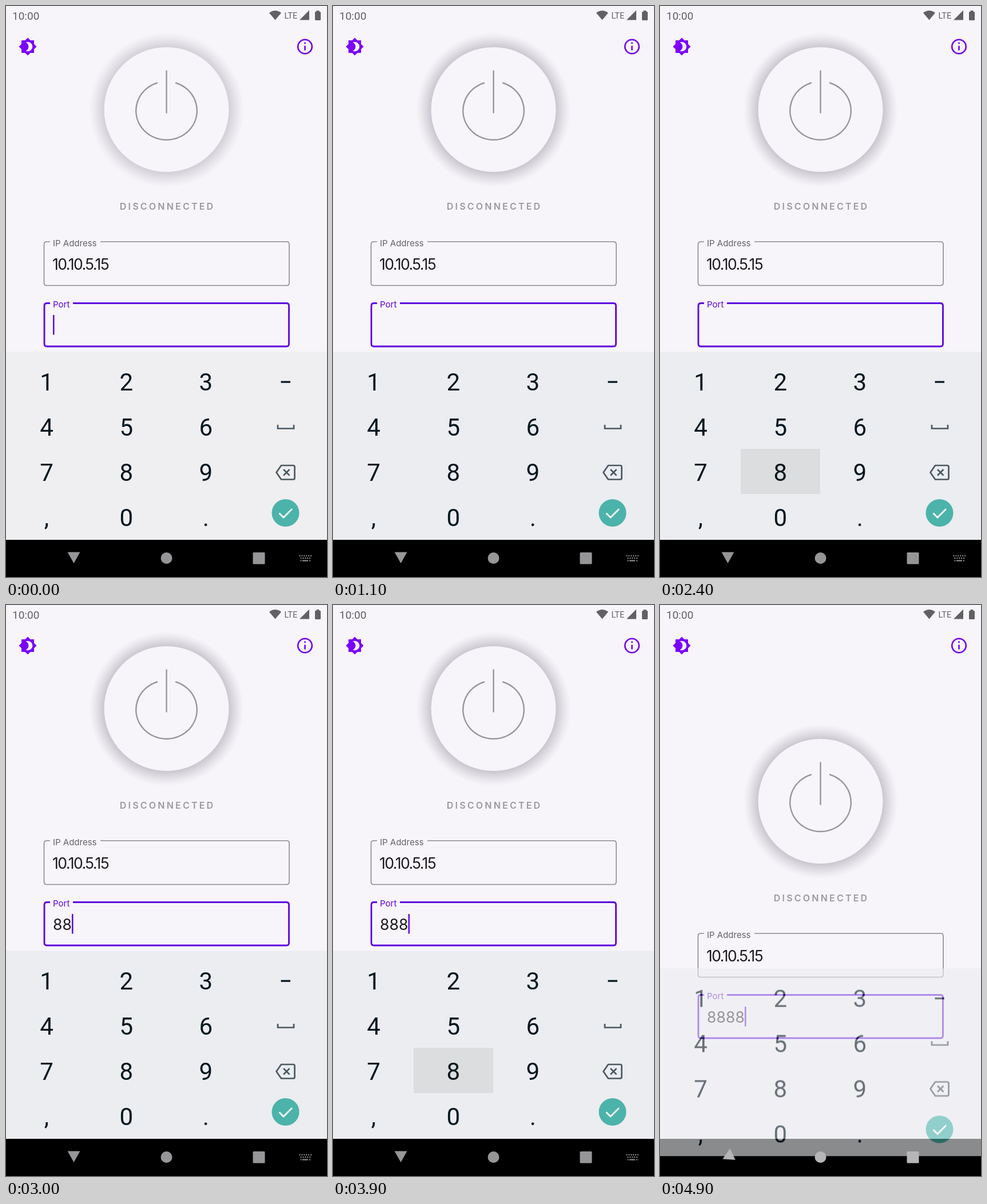
Recreate the animation shown at these times as an HTML page. Size 561x998 px, loop 5 s.

```html
<!DOCTYPE html>
<html lang="en">
<head>
<meta charset="utf-8">
<title>Connection screen</title>
<style>
  html, body { margin: 0; width: 100%; height: 100%; overflow: hidden; background: #f7f5f9; }
  svg { display: block; width: 561px; height: 998px; }
  .line { fill: none; }
  .ui { font-family: Inter, sans-serif; }
  .label { font-size: 15px; }
  .value { font-size: 26.5px; fill: #1c1a1f; }
  .state { font-size: 16px; font-weight: 600; letter-spacing: 3.2px; fill: #9b999f; }
  .sys { font-family: Roboto, sans-serif; fill: #616063; }
  .digits { font: 42px Roboto, sans-serif; fill: #04161f; text-anchor: middle; }

  .anim { animation: 5s linear infinite; }
  .step { animation: 5s step-end infinite; }
  #content { animation-name: drop; }
  #shadow { animation-name: settle; }
  #typed { animation-name: type; }
  #caret { animation-name: blink; }
  #press { animation-name: press; }
  #keyboard { animation-name: leave; }
  #panel { animation-name: tint; }
  #back { animation-name: turn; transform-origin: 118.5px 964px; }
  #icons { animation-name: lighten; }
  #switcher { animation-name: vanish; }

  @keyframes drop { 0% { transform: none; } 97%, 100% { transform: translateY(162px); } }
  @keyframes settle { 0% { opacity: .8; } 12%, 100% { opacity: 1; } }
  @keyframes tint { 0% { fill: #efeef1; } 12%, 100% { fill: #ebedf0; } }
  @keyframes type {
    0% { transform: none; }
    49.4% { transform: translateX(16.5px); }
    59.2% { transform: translateX(33px); }
    69.4% { transform: translateX(49.5px); }
    78.8%, 100% { transform: translateX(66px); }
  }
  @keyframes blink {
    0%, 11.6%, 31.6%, 49.4%, 59.2%, 69.4%, 78.8%, 96.8%, 100% { opacity: 1; }
    1.6%, 21.6%, 41.6%, 58.4%, 68.2%, 78.4%, 87.8% { opacity: 0; }
  }
  @keyframes press {
    0%, 49.4%, 59.2%, 69.4%, 78.8%, 100% { opacity: 0; }
    47.6%, 57.6%, 67.6%, 77.6% { opacity: 1; }
  }
  @keyframes leave {
    0%, 97% { transform: none; opacity: 1; }
    98% { transform: translateY(30px); opacity: .6; }
    99.5%, 100% { transform: translateY(66px); opacity: 0; }
  }
  @keyframes turn {
    0%, 97% { transform: none; }
    98% { transform: rotate(64deg); }
    99%, 100% { transform: rotate(90deg); }
  }
  @keyframes lighten { 0% { fill: #969597; } 97%, 100% { fill: #b6b5b7; } }
  @keyframes vanish { 0% { opacity: 1; } 97%, 100% { opacity: 0; } }
</style>
</head>
<body>
<svg viewBox="0 0 561 998">
  <defs>
    <radialGradient id="halo" gradientUnits="userSpaceOnUse" cx="280.5" cy="181.5" r="135">
      <stop offset=".8" stop-color="#c8c6cd"/>
      <stop offset=".87" stop-color="#dbd9df"/>
      <stop offset=".94" stop-color="#eceaef"/>
      <stop offset="1" stop-color="#f7f5f9"/>
    </radialGradient>
  </defs>
  <rect width="561" height="998" fill="#f7f5f9"/>

  <!-- Status bar -->
  <g class="sys">
    <text x="11" y="23.5" font-size="19">10:00</text>
    <path d="M460 12Q470.500 4 481 12L470.500 24.500Z"/>
    <text x="486.500" y="21.500" font-size="14.500">LTE</text>
    <path d="M513 24.500H530V7.500Z"/>
    <path d="M542.500 8h5v2h1.500q1 0 1 1v13q0 1-1 1h-8q-1 0-1-1V11q0-1 1-1h1.500z"/>
  </g>

  <!-- Toolbar icons -->
  <path transform="translate(21.600 54.600) scale(1.370)" fill="#7b00fb" d="M20 8.690V4h-4.690L12 .690 8.690 4H4v4.690L.690 12 4 15.310V20h4.690L12 23.310 15.310 20H20v-4.690L23.310 12zM12 18c-.890 0-1.740-.200-2.500-.550C11.560 16.500 13 14.420 13 12s-1.440-4.500-3.500-5.450C10.260 6.200 11.110 6 12 6c3.310 0 6 2.690 6 6s-2.690 6-6 6z"/>
  <g class="line" stroke="#7200ee" stroke-width="2.6">
    <circle cx="522.5" cy="71" r="12.3"/>
    <path d="M522.500 63.500v2.700M522.500 69.500v8"/>
  </g>

  <g id="content" class="step">
    <circle id="shadow" class="anim" cx="280.5" cy="181.5" r="135" fill="url(#halo)"/>
    <circle cx="280.5" cy="181" r="109" fill="#f7f5f9"/>
    <path class="line" stroke="#98969c" stroke-width="2.4" stroke-linecap="round" d="M280.500 113.500V186.500M264 134.500A53.300 51 0 1 0 297 134.500"/>
    <text class="ui state" x="282.1" y="356" text-anchor="middle">DISCONNECTED</text>

    <path class="line" stroke="#8c8a8f" stroke-width="1.6" d="M77 412H71Q66.500 412 66.500 416.500V484Q66.500 488.500 71 488.500H490.500Q495 488.500 495 484V416.500Q495 412 490.500 412H165"/>
    <text class="ui label" x="82" y="419.5" fill="#646267">IP Address</text>
    <text class="ui value" x="81" y="460.5" letter-spacing="-1.5">10.10.5.15</text>

    <path class="line" stroke="#5c00df" stroke-width="2.8" d="M77 519.500H71.500Q67 519.500 67 524V590.500Q67 595 71.500 595H490Q494.500 595 494.500 590.500V524Q494.500 519.500 490 519.500H117"/>
    <text class="ui label" x="82" y="526.5" fill="#5c00df">Port</text>
    <text class="ui value" x="82 98.5 115 131.5" y="567.5">8888</text>
    <g id="typed" class="step">
      <rect x="82" y="536" width="80" height="44" fill="#f7f5f9"/>
      <rect id="caret" class="step" x="82" y="540" width="2.5" height="34.5" fill="#5c00df"/>
    </g>
  </g>

  <rect y="933" width="561" height="65"/>

  <g id="keyboard" class="anim">
    <rect id="panel" class="anim" y="604.5" width="561" height="328.5" fill="#ebedf0"/>
    <rect id="press" class="step" x="141" y="774" width="139" height="79" fill="#dbdddf"/>
    <g id="keys" class="digits"></g>
    <rect x="480.5" y="655.5" width="16.5" height="3.2" fill="#04161f"/>
    <g class="line" stroke="#4b5960" stroke-width="2.7">
      <path d="M475 732V738.500H503V732"/>
      <path stroke-linejoin="round" d="M481 803H502Q504.500 803 504.500 805.500V825Q504.500 827.500 502 827.500H481L472.500 815.200Z"/>
      <path d="M485 810l10.500 10.500M495.500 810l-10.500 10.500"/>
    </g>
    <circle cx="488.5" cy="886" r="24" fill="#4cb3aa"/>
    <path class="line" stroke="#fff" stroke-width="2.8" d="M477.500 886.500l7.500 7.500 15-15"/>
  </g>

  <!-- Navigation bar -->
  <g id="icons" class="step" fill="#969597">
    <path id="back" class="anim" d="M107.500 954.500H129.500L118.500 974Z" stroke-linejoin="round"/>
    <circle cx="280.5" cy="965" r="10"/>
    <rect x="431.5" y="955" width="21" height="20.5" rx="1.5"/>
    <g id="switcher" class="step"></g>
  </g>
</svg>
<script>
  const add = (parent, tag, attrs, text = '') => {
    const el = document.createElementNS('http://www.w3.org/2000/svg', tag);
    for (const name in attrs) el.setAttribute(name, attrs[name]);
    el.textContent = text;
    document.getElementById(parent).append(el);
  };
  [...'123456789,0.'].forEach((key, i) =>
    add('keys', 'text', { x: 71 + i % 3 * 139.2, y: 672 + Math.floor(i / 3) * 79 }, key));

  const dot = (x, y, width = 2) => add('switcher', 'rect', { x, y, width, height: 2 });
  for (let col = 0; col < 6; col++) {
    dot(512.5 + col * 3.9, 960);
    if (col < 5) dot(514.5 + col * 3.9, 964);
  }
  dot(514.5, 968.5);
  dot(518, 968.5, 10);
  dot(530, 968.5);
</script>
</body>
</html>
```
